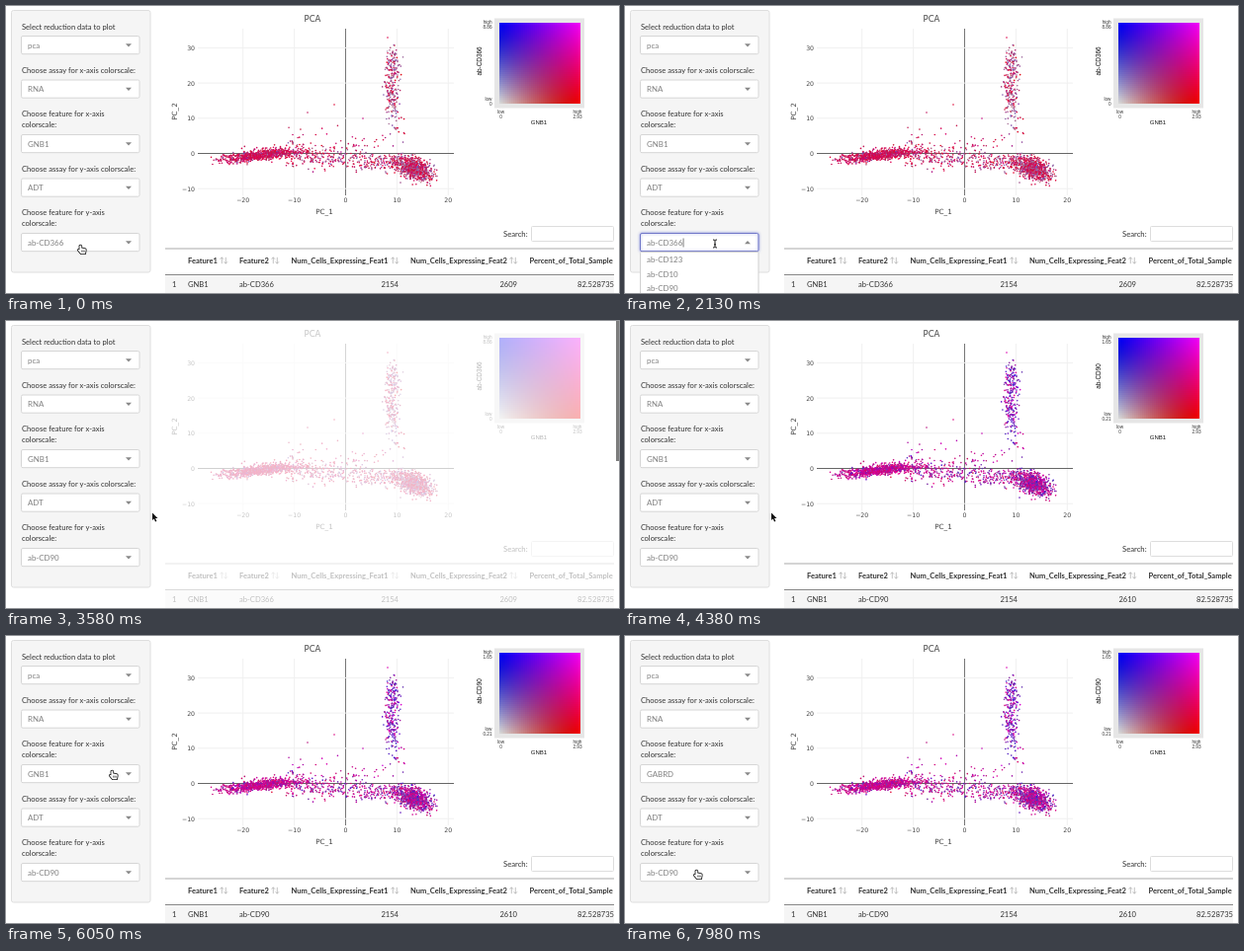
Write an HTML page with a canvas that moves like this. It is 620 px wide and 291 px high and loops after 8 s.

```html
<!DOCTYPE html>
<html lang="en">
<head>
<meta charset="utf-8">
<title>Reduction plot explorer</title>
<style>
  html, body { margin: 0; width: 100%; height: 100%; overflow: hidden; background: #fff; }
  canvas { position: absolute; left: 0; top: 0; width: 620px; height: 291px; }
</style>
</head>
<body>
<canvas id="results"></canvas>
<canvas id="controls"></canvas>
<script>
const W = 620, H = 291, LOOP = 8000;
const LATO = 'Lato, sans-serif', PLOT = '"DejaVu Sans", sans-serif', ARIAL = '"Liberation Sans", sans-serif';
const ratio = Math.max(1, window.devicePixelRatio || 1);

function context(id) {
  const canvas = document.getElementById(id);
  canvas.width = W * ratio;
  canvas.height = H * ratio;
  const ctx = canvas.getContext('2d');
  ctx.scale(ratio, ratio);
  return ctx;
}
const main = context('results'), side = context('controls');

// ---------- drawing helpers ----------
function text(c, str, x, y, size, family, color, align = 'left', weight = 400) {
  c.font = `${weight} ${size}px ${family}`;
  c.fillStyle = color;
  c.textAlign = align;
  c.fillText(str, x, y);
}
function turned(c, str, x, y, size, family, color) {
  c.save();
  c.translate(x, y);
  c.rotate(-Math.PI / 2);
  text(c, str, 0, 0, size, family, color, 'center');
  c.restore();
}
function line(c, x1, y1, x2, y2, color, width = 1) {
  c.strokeStyle = color;
  c.lineWidth = width;
  c.beginPath();
  c.moveTo(x1, y1);
  c.lineTo(x2, y2);
  c.stroke();
}
function box(c, x, y, w, h, radius, fill, stroke) {
  c.beginPath();
  c.roundRect(x, y, w, h, radius);
  c.fillStyle = fill;
  c.fill();
  c.strokeStyle = stroke;
  c.lineWidth = 1;
  c.stroke();
}

// Grey at low/low, red along x, blue along y, magenta at high/high.
function blend(u, v) {
  const grey = 212 * ((1 - u) * (1 - v)) ** 1.4;
  const red = Math.min(245, 240 * u + grey), blue = Math.min(250, 245 * v + grey);
  return `rgb(${red | 0},${grey | 0},${blue | 0})`;
}

// ---------- cells ----------
let seed = 41;
function rand() {
  seed = seed + 0x6D2B79F5 | 0;
  let t = Math.imul(seed ^ seed >>> 15, 1 | seed);
  t = t + Math.imul(t ^ t >>> 7, 61 | t) ^ t;
  return ((t ^ t >>> 14) >>> 0) / 4294967296;
}
const gauss = () => Math.sqrt(-2 * Math.log(1 - rand())) * Math.cos(2 * Math.PI * rand());
const clamp = (v, lo = 0, hi = 1) => Math.min(hi, Math.max(lo, v));
function normal(mean, sd, lo, hi) {
  let v;
  do v = mean + sd * gauss(); while (v < lo || v > hi);
  return v;
}

const cells = [];
function cluster(count, lowShare, cd366, cd90, place) {
  for (let i = 0; i < count; i++) {
    const [x, y] = place();
    const u = rand() < lowShare ? 0.1 + 0.35 * rand() : 0.82 + 0.1 * gauss();
    cells.push({
      x, y, u: clamp(u),
      'ab-CD366': clamp(cd366 + 0.09 * gauss()),
      'ab-CD90': clamp(cd90 + 0.11 * gauss())
    });
  }
}
cluster(850, 0.12, 0.29, 0.55, () => {
  const x = normal(257, 20, 207, 312);
  return [x, 151.5 - (x - 257) * 0.11 + 2.6 * gauss()];
});
cluster(370, 0.3, 0.28, 0.55, () => {
  const x = 283 + 117 * rand();
  return [x, 150 + (x - 283) * 0.08 + 5.5 * gauss()];
});
cluster(800, 0.45, 0.25, 0.55, () => {
  const x = normal(413, 9.5, 382, 436);
  return [x, normal(164.5 + (x - 412) * 0.27, 5.5, 147, 183)];
});
cluster(260, 0.6, 0.24, 0.64, () => [390.5 + 4 * gauss(), normal(78, 23, 39, 126)]);
cluster(45, 0.2, 0.28, 0.58, () => [280 + 125 * rand(), 142 - 24 * rand() * rand()]);
for (const spot of [[386, 32], [332, 100], [305, 108], [361, 114]]) cluster(1, 0, 0.3, 0.6, () => spot);

// ---------- results: scatter, colour key, table ----------
const plotX = v => 343.5 + v * 5.19, plotY = v => 149.5 - v * 3.57;
const tickLabel = v => String(v).replace('-', '−');

function drawScatter(feature) {
  for (const v of [-20, -10, 0, 10, 20]) {
    line(main, plotX(v), 23, plotX(v), 192, v ? '#f0f0f0' : '#777');
    text(main, tickLabel(v), plotX(v), 199.3, 6.2, PLOT, '#444', 'center');
  }
  for (const v of [-10, 0, 10, 20, 30]) {
    line(main, 194, plotY(v), 453, plotY(v), v ? '#f0f0f0' : '#666');
    text(main, tickLabel(v), 191, plotY(v) + 2.4, 6.2, PLOT, '#444', 'right');
  }
  for (const cell of cells) {
    main.fillStyle = blend(cell.u, cell[feature]);
    main.beginPath();
    main.arc(cell.x, cell.y, 0.82, 0, 7);
    main.fill();
  }
  text(main, 'PCA', 310, 16, 8.5, PLOT, '#444', 'center');
  text(main, 'PC_1', 322, 210.5, 7.2, PLOT, '#444', 'center');
  turned(main, 'PC_2', 172.5, 107, 7.2, PLOT, '#444');
}

function drawColorKey(feature, low, high) {
  main.fillStyle = '#e6e6e6';
  main.fillRect(494, 12.5, 91, 91);
  const n = 41;
  for (let i = 0; i < n; i++) {
    for (let j = 0; j < n; j++) {
      main.fillStyle = blend(i / (n - 1), 1 - j / (n - 1));
      main.fillRect(499 + 2 * i, 17 + 2 * j, 2, 2);
    }
  }
  const small = (str, x, y, align) => text(main, str, x, y, 4.7, ARIAL, '#333', align);
  small('high', 491.5, 18.3, 'right');
  small(high, 491.5, 23.3, 'right');
  small('low', 491.5, 95.5, 'right');
  small(low, 491.5, 100.5, 'right');
  small('low', 500.5, 108.6, 'center');
  small('0', 500.5, 113.6, 'center');
  small('high', 578, 108.6, 'center');
  small('2.93', 578, 113.6, 'center');
  text(main, 'GNB1', 539, 120.2, 6, ARIAL, '#111', 'center');
  turned(main, feature, 481, 56, 6.4, ARIAL, '#111');
}

function sortIcon(x) {
  for (const [dx, dir] of [[1.8, -1], [5.8, 1]]) {
    const tip = 258 + 3.2 * dir;
    line(main, x + dx, 258 - 3.2 * dir, x + dx, tip, '#aaa', 0.7);
    main.beginPath();
    main.moveTo(x + dx - 1.7, tip - 1.9 * dir);
    main.lineTo(x + dx, tip);
    main.lineTo(x + dx + 1.7, tip - 1.9 * dir);
    main.stroke();
  }
}

function drawTable(feature, count) {
  text(main, 'Search:', 503, 233.5, 7.7, LATO, '#333');
  box(main, 531.5, 223.5, 83, 15, 1, '#fff', '#ddd');
  main.save();
  main.beginPath();
  main.rect(161, 240, 454, 51);
  main.clip();
  main.fillStyle = '#f5f5f5';
  main.fillRect(161, 272, 454, 19);
  line(main, 161, 246, 615, 246, '#aaa');
  line(main, 161, 272.5, 615, 272.5, '#888');
  const head = (str, x) => text(main, str, x, 260.7, 7.55, LATO, '#333', 'left', 700);
  head('Feature1', 184);
  head('Feature2', 236);
  head('Num_Cells_Expressing_Feat1', 288.5);
  head('Num_Cells_Expressing_Feat2', 409);
  head('Percent_of_Total_Sample', 529.5);
  [216.5, 268.5, 389.5, 509.5].forEach(sortIcon);
  const value = (str, x, align) => text(main, str, x, 285.4, 7.6, LATO, '#333', align);
  value('1', 168);
  value('GNB1', 184);
  value(feature, 236);
  value('2154', 397, 'right');
  value(count, 517, 'right');
  value('82.528735', 578);
  main.restore();
}

function drawResults(feature) {
  const before = feature === 'ab-CD366';
  main.clearRect(0, 0, W, H);
  drawScatter(feature);
  drawColorKey(feature, before ? '0' : '0.21', before ? '8.86' : '1.65');
  drawTable(feature, before ? '2609' : '2610');
}

// ---------- timing ----------
const Y_MENU = { open: 1650, pick: 2760, blur: 3000 };
const X_MENU = { open: 6250, pick: 7380, blur: 7560 };
const FADE_START = 3020, REDRAW = 3960, FADE_TIME = 250;

const pointerPath = [
  [0, 77, 247], [300, 77, 247], [1000, 97, 235], [1750, 97, 235], [2080, 91, 241], [2250, 91, 241],
  [2650, 68, 286], [2800, 68, 286], [3300, 150.5, 199], [5050, 150.5, 199], [5750, 109, 141],
  [6400, 109, 141], [7050, 66, 187], [7420, 66, 187], [7850, 74, 242], [LOOP + 1, 74, 242]
];
function pointerAt(t) {
  const k = pointerPath.findIndex(p => p[0] > t);
  const [t0, x0, y0] = pointerPath[k - 1], [t1, x1, y1] = pointerPath[k];
  const p = (t - t0) / (t1 - t0), e = p * p * (3 - 2 * p);
  return { x: x0 + (x1 - x0) * e, y: y0 + (y1 - y0) * e };
}
const during = (t, from, to) => t >= from && t < to;

// ---------- controls ----------
function drawSelect(y, value, t, menu, options, pointer) {
  const isOpen = menu && during(t, menu.open, menu.pick);
  const focused = menu && during(t, menu.open, menu.blur);
  if (focused) {
    side.shadowColor = 'rgba(90,100,210,.6)';
    side.shadowBlur = 3 * ratio;
  }
  box(side, 15.5, y, 119.5, 18.2, 1.5, '#fff', focused ? '#7279c9' : '#d6d6d6');
  side.shadowBlur = 0;
  text(side, value, 22, y + 12.2, 7.9, LATO, '#808080');
  if (focused && (t - menu.open) % 1060 < 530) {
    const end = 22.8 + side.measureText(value).width;
    line(side, end, y + 5, end, y + 14, '#444', 0.7);
  }
  const dir = isOpen ? -1 : 1, mid = y + 9.3;
  side.fillStyle = '#888';
  side.beginPath();
  side.moveTo(121, mid - 1.5 * dir);
  side.lineTo(127, mid - 1.5 * dir);
  side.lineTo(124, mid + 1.7 * dir);
  side.fill();
  if (!isOpen) return;
  const top = y + 19, row = 14.2;
  box(side, 15.5, top, 119.5, options.length * row + 2, 1, '#fff', '#d0d0d0');
  options.forEach((option, i) => {
    const rowTop = top + 1 + i * row;
    if (during(pointer.y, rowTop, rowTop + row)) {
      side.fillStyle = '#f0f3f6';
      side.fillRect(16, rowTop, 118, row);
    }
    text(side, option, 22, rowTop + 9.8, 7.9, LATO, '#808080');
  });
}

const HAND = new Path2D('M-2.6-3.9q1-1.3 1.9 0v2.3l3.5.6q1.2.3 1 1.6l-.7 3.7h-4.3l-2.9-3.6q0-1.4 1.5-.5z');
const ARROW = new Path2D('M-2.5-4.5v7.6l1.7-1.5 1.3 3 1.4-.6-1.3-2.9h2.4z');
const BEAM = new Path2D('M-2-4q1.6 0 2 .8q.4-.8 2-.8M0-3.2v6.4M-2 4q1.6 0 2-.8q.4.8 2 .8M-1 .9h2');

function drawPointer(t, { x, y }) {
  side.save();
  side.translate(x, y);
  side.lineJoin = 'round';
  const typing = during(t, Y_MENU.open, 2450) || during(t, X_MENU.open, 6560);
  if (typing) {
    side.strokeStyle = '#111';
    side.lineWidth = 1;
    side.stroke(BEAM);
  } else {
    const arrow = x > 135;
    side.fillStyle = arrow ? '#111' : '#fff';
    side.strokeStyle = arrow ? '#fff' : '#111';
    side.lineWidth = arrow ? 1.2 : 1.6;
    side.stroke(arrow ? ARROW : HAND);
    side.fill(arrow ? ARROW : HAND);
    if (!arrow) {
      side.lineWidth = 0.6;
      side.stroke(new Path2D('M-.3.6v2M1 .6v2M2.2.8v1.8'));
    }
  }
  side.restore();
}

function drawControls(t) {
  const pointer = pointerAt(t);
  side.clearRect(0, 0, W, H);
  box(side, 5.5, 4.5, 140.5, 265.5, 2, '#f5f5f5', '#dedede');
  const label = (str, y) => text(side, str, 16, y, 7.6, LATO, '#333');
  label('Select reduction data to plot', 23.5);
  label('Choose assay for x-axis colorscale:', 68);
  label('Choose feature for x-axis', 112);
  label('colorscale:', 123.2);
  label('Choose assay for y-axis colorscale:', 168);
  label('Choose feature for y-axis', 212);
  label('colorscale:', 223.2);
  drawSelect(30.5, 'pca');
  drawSelect(75, 'RNA');
  drawSelect(175, 'ADT');
  drawSelect(230.5, t < Y_MENU.pick ? 'ab-CD366' : 'ab-CD90', t, Y_MENU,
    ['ab-CD123', 'ab-CD10', 'ab-CD90', 'ab-CD34'], pointer);
  drawSelect(130.5, t < X_MENU.pick ? 'GNB1' : 'GABRD', t, X_MENU,
    ['CALML6', 'TMEM52', 'GABRD', 'PRKCZ', 'SKI', 'MORN1'], pointer);
  if (during(t, 2700, 3850)) {
    side.fillStyle = '#7d7d7d';
    side.fillRect(617, 0, 3, 142);
  }
  drawPointer(t, pointer);
}

const start = performance.now();
let shown = '';
function frame(now) {
  const t = Math.max(0, now - start) % LOOP;
  const feature = t < REDRAW ? 'ab-CD366' : 'ab-CD90';
  if (feature !== shown) drawResults(shown = feature);
  const faded = clamp((t - FADE_START) / FADE_TIME) - clamp((t - REDRAW) / 100);
  main.canvas.style.opacity = 1 - 0.7 * faded;
  drawControls(t);
  requestAnimationFrame(frame);
}
requestAnimationFrame(frame);
</script>
</body>
</html>
```
